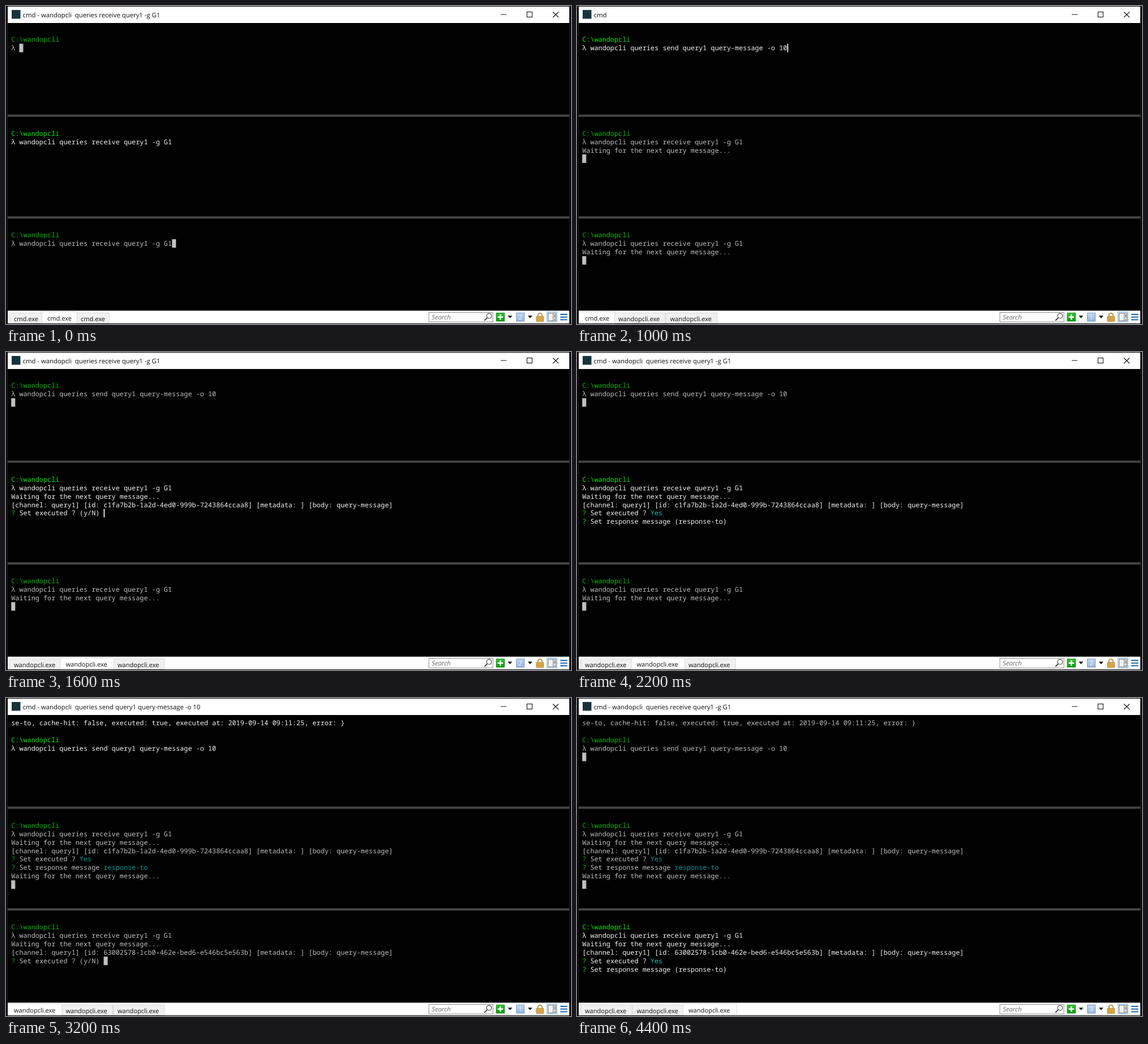
An HTML page that plays this animation: 998x561 px, repeating every 4.6 s.

```html
<!DOCTYPE html>
<html lang="en">
<head>
<meta charset="utf-8">
<title>Terminal</title>
<style>
  html, body { margin: 0; width: 100%; height: 100%; overflow: hidden; background: #000; }
  svg { display: block; width: 998px; height: 561px; }
  text { white-space: pre; text-rendering: geometricPrecision; }
  .ui { font-family: "Open Sans", "Noto Sans", sans-serif; }
  .mono { font: 11.833px "Noto Sans Mono", "DejaVu Sans Mono", monospace; }
</style>
</head>
<body>
<svg viewBox="0 0 998 561" xmlns="http://www.w3.org/2000/svg">
  <defs>
    <linearGradient id="green" x2="0" y2="1"><stop stop-color="#35c235"/><stop offset="1" stop-color="#0a970a"/></linearGradient>
    <linearGradient id="blue" x2="0" y2="1"><stop stop-color="#c3d7f0"/><stop offset="1" stop-color="#93b4dd"/></linearGradient>
    <path id="drop" d="M0 0h8l-4 4.5z" fill="#111"/>
  </defs>

  <rect width="998" height="561" fill="#010101"/>
  <path d="M2.5 30V537M995.5 30V537" stroke="#242424"/>
  <rect x="3" y="1" width="992" height="29" fill="#fff"/>
  <path d="M3 193.5H995M3 373H995" stroke="#454545" stroke-width="4"/>
  <rect x="3" y="537.5" width="992" height="22.5" fill="#fff"/>

  <rect x="10" y="7" width="15.5" height="15.5" fill="#17343d"/>
  <g fill="none" stroke="#111" stroke-width="1.1">
    <path d="M874 15H884M966 10.5L976 20M976 10.5L966 20"/>
    <rect x="920.3" y="10.5" width="9" height="9"/>
  </g>

  <rect x="747" y="540.5" width="113" height="17" fill="#fff" stroke="#8a8a8a"/>
  <text class="ui" x="752" y="553" font-size="11.3" font-style="italic" fill="#6c6c6c">Search</text>
  <g fill="none" stroke="#444" stroke-width="1.2">
    <circle cx="853.3" cy="546.7" r="4.3"/>
    <path d="M850.2 549.8L845 555" stroke-width="1.8"/>
  </g>

  <rect x="866" y="541.5" width="14.5" height="14.5" fill="url(#green)" stroke="#0b8a0b" stroke-width=".8"/>
  <path d="M868.5 548.8H878M873.2 544V553.5" stroke="#fff" stroke-width="2.6"/>
  <use href="#drop" x="886.3" y="546.3"/>
  <rect x="901.5" y="541.5" width="14" height="14.5" fill="url(#blue)" stroke="#7d9cc8"/>
  <use href="#drop" x="921.8" y="546.3"/>

  <path d="M939.5 549V545.5a3.7 3.7 0 0 1 7.4 0V549" fill="none" stroke="#b98a35" stroke-width="1.8"/>
  <rect x="936.8" y="547.5" width="13" height="9" rx="1" fill="#e0ac4b" stroke="#a97a2a" stroke-width=".8"/>
  <path d="M938 550.5H949M938 553.5H949" stroke="#b98a35" stroke-width=".8"/>

  <rect x="955" y="539.5" width="18.5" height="18.5" fill="#cfe6f8" stroke="#9ccbee"/>
  <rect x="957.5" y="542" width="14" height="13.5" fill="#f3f3f3" stroke="#777"/>
  <path d="M966.5 542V555.5" stroke="#777"/>
  <path d="M969.2 544V550M969.2 552V554" stroke="#888" stroke-width="2"/>
  <path d="M979 544H991.5M979 548.8H991.5M979 553.5H991.5" stroke="#1769b8" stroke-width="1.9"/>

  <g id="live"></g>
</svg>
<script>
const LOOP = 4600, COL = 7.1, ROW = 14.97, LEFT = 9.2;
const PANE_TOP = [36.6, 216.9, 396.4 - ROW];
PANE_TOP[1] -= ROW;

const APP = 'wandopcli';
const PATH = 'C:\\' + APP;
const SEND = APP + ' queries send query1 query-message -o 10';
const RECEIVE = APP + ' queries receive query1 -g G1';
const titleOf = cmd => 'cmd - ' + cmd.replace(' ', '  ');
const T_SEND = titleOf(SEND), T_RECEIVE = titleOf(RECEIVE);

const WAIT = 'Waiting for the next query message...';
const ASK = '? Set executed ? (y/N) ';
const YES = '? Set executed ? |Yes';
const REPLY = '? Set response message (response-to) ';
const REPLIED = '? Set response message |response-to';
const message = id => `[channel: query1] [id: ${id}] [metadata: ] [body: query-message]`;
const MSG_A = message('c1fa7b2b-1a2d-4ed0-999b-7243864ccaa8');
const MSG_B = message('63002578-1cb0-462e-bed6-e546bc5e563b');
const RESULT = 'se-to, cache-hit: false, executed: true, executed at: 2019-09-14 09:11:25, error: }';

const fresh = ['', PATH, 'λ '];
const sending = ['', PATH, 'λ ' + SEND];
const receiving = ['', PATH, 'λ ' + RECEIVE];
const waiting = [...receiving, WAIT];
const gotA = [...waiting, MSG_A];
const gotB = [...waiting, MSG_B];
const answered = [RESULT, '', PATH];

// Each step overrides part of the one before; the caret sits after the last line.
// tabs: c = cmd.exe, k = the running tool.
const steps = [
  { at: 0, active: 1, caret: 0, title: T_RECEIVE, tabs: 'ccc', p0: fresh, p1: receiving, p2: receiving },
  { at: 200, caret: 1, p1: [...waiting, ''] },
  { at: 400, active: 2, caret: 0, title: 'cmd', tabs: 'ckc' },
  { at: 600, caret: 1 },
  { at: 800, title: T_RECEIVE, p2: [...waiting, ''] },
  { at: 1000, active: 0, title: 'cmd', tabs: 'ckk', p0: sending },
  { at: 1200, title: T_SEND, tabs: 'kkk', p0: [...sending, ''], p1: [...gotA, ASK] },
  { at: 1400, caret: 0 },
  { at: 1600, active: 1, caret: 1, title: T_RECEIVE },
  { at: 1800, p1: [...gotA, ASK + 'y'] },
  { at: 2000, p1: [...gotA, YES, REPLY] },
  { at: 2200, caret: 0 },
  { at: 2400, caret: 1, p0: [...answered, 'λ '], p1: [...gotA, YES, REPLIED, WAIT, ''] },
  { at: 2600, active: 0, title: 'cmd', tabs: 'ckk', p0: [...answered, 'λ ' + SEND] },
  { at: 2800, caret: 0 },
  { at: 3000, caret: 1, title: T_SEND, p0: [...answered, 'λ ' + SEND, ''], p2: [...gotB, ASK] },
  { at: 3200, caret: 0, tabs: 'kkk' },
  { at: 3600, active: 2, caret: 1, title: T_RECEIVE },
  { at: 3800, caret: 0 },
  { at: 4000, caret: 1, p2: [...gotB, YES, REPLY] },
  { at: 4400, caret: 0 }
];
const states = [];
steps.forEach((step, i) => states.push({ ...states[i - 1], ...step }));

const BRIGHT = { text: '#f4f4f4', green: '#00ec00', cyan: '#00c6ce' };
const FADED = { text: '#bebebe', green: '#00b800', cyan: '#009ca2' };

const rect = (x, y, w, h, fill, extra = '') =>
  `<rect x="${x}" y="${y}" width="${w}" height="${h}" fill="${fill}" ${extra}/>`;
const label = (x, y, size, str, fill = '#111') =>
  `<text class="ui" x="${x}" y="${y}" font-size="${size}" fill="${fill}">${str}</text>`;
const span = (str, fill) => `<tspan fill="${fill}">${str}</tspan>`;

function colour(line, c) {
  if (line === PATH) return span(line, c.green);
  const [plain, accent = ''] = line.split('|');
  const mark = plain[0] === '?' ? 1 : 0;
  return span(plain.slice(0, mark), c.green) + span(plain.slice(mark), c.text) + span(accent, c.cyan);
}

function pane(lines, top, active, caret) {
  const c = active ? BRIGHT : FADED;
  const last = lines.length - 1;
  const x = LEFT + lines[last].length * COL, y = top + last * ROW;
  let out = lines.map((line, i) => line &&
    `<text class="mono" x="${LEFT}" y="${top + i * ROW + 11.7}">${colour(line, c)}</text>`).join('');
  if (!active) out += rect(x, y, COL, ROW, '#c0c0c0');
  else if (caret) out += rect(x, y, 1.8, ROW, '#f4f4f4');
  return out;
}

function tabBar(tabs, active) {
  let x = 14, back = '', front = '';
  [...tabs].forEach((kind, i) => {
    const w = kind === 'c' ? 59 : 91.5;
    const name = (kind === 'c' ? 'cmd' : APP) + '.exe';
    if (i === active) {
      front = rect(x - 9.5, 539.5, w + 3, 21, '#fff', 'stroke="#dcdcdc"') +
        rect(x - 9, 558, w + 2, 2, '#fff') + label(x, 555, 11.05, name);
    } else {
      back += rect(x - 7.5, 541.5, w - 1, 18, '#f0f0f0', 'stroke="#d9d9d9"') + label(x, 556, 11.05, name);
    }
    x += w;
  });
  return back + front + rect(0, 560, 998, 1, '#010101');
}

const live = document.getElementById('live');
function draw(s) {
  live.innerHTML = label(29.5, 19.6, 11.35, s.title) +
    PANE_TOP.map((top, i) => pane(s['p' + i], top, i === s.active, s.caret)).join('') +
    tabBar(s.tabs, s.active) +
    label(905.3, 553, 11, s.active + 1, '#f4f8ff');
}

const start = performance.now();
let shown = null;
function tick() {
  const t = (performance.now() - start) % LOOP;
  const state = states.findLast(s => s.at <= t) || states[0];
  if (state !== shown) draw(shown = state);
  requestAnimationFrame(tick);
}
tick();
</script>
</body>
</html>
```
